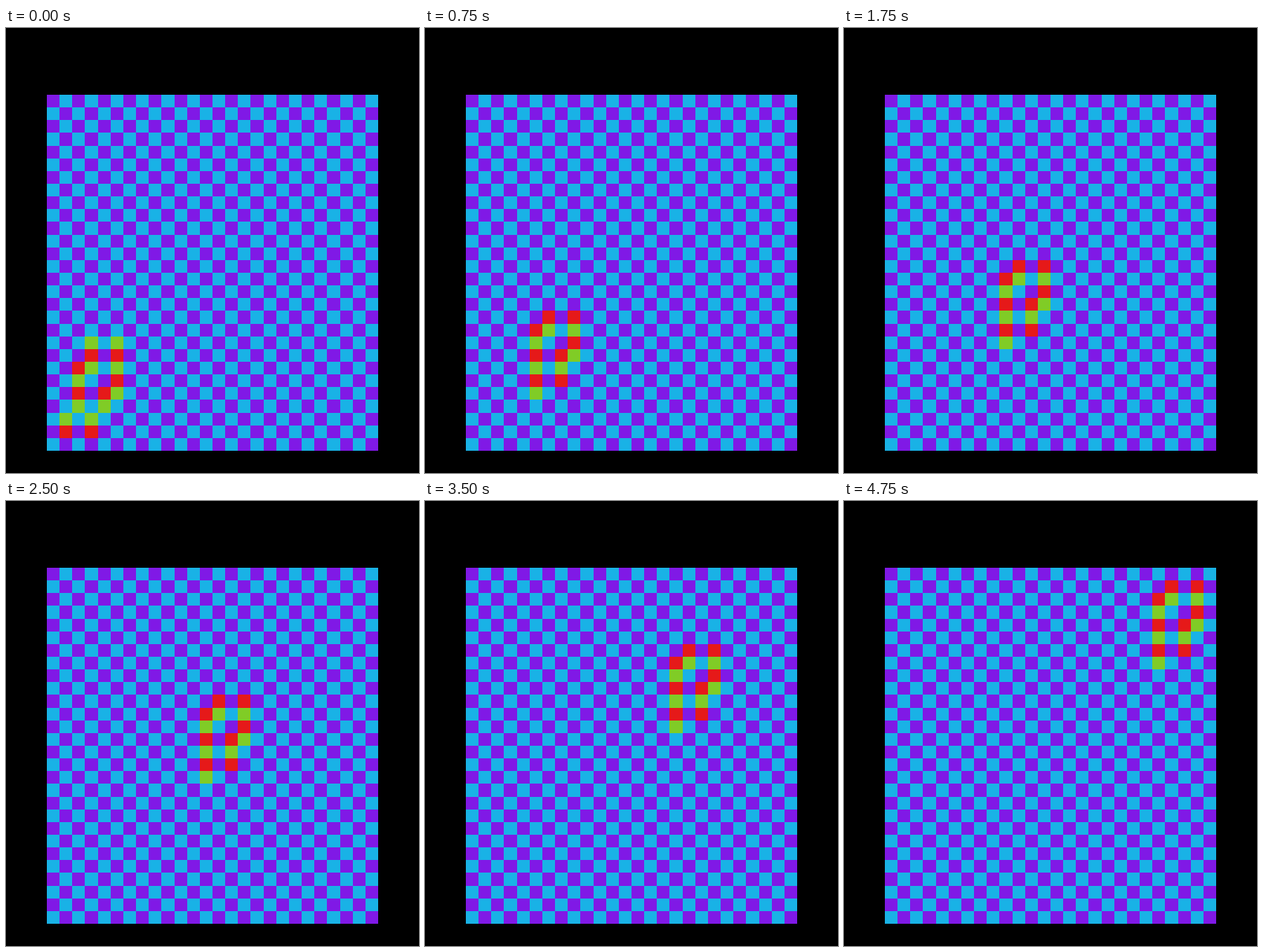
These frames come from a looping animation (556 px wide and 600 px high, 5000 ms). An HTML page with a canvas:

```html
<!DOCTYPE html>
<html lang="en">
<head>
<meta charset="utf-8">
<title>Checkerboard glider</title>
<style>
  html, body { margin: 0; width: 100%; height: 100%; overflow: hidden; background: #000; }
  canvas { display: block; }
</style>
</head>
<body>
<canvas id="stage" width="556" height="600"></canvas>
<script>
const ctx = document.getElementById('stage').getContext('2d');
const COLS = 26, ROWS = 28, STEP_MS = 250, STEPS = 20;
const BOARD = { x: 55, y: 90, w: 446, h: 480 };
// Colour pairs, indexed by the parity of column + row.
const RESTING = ['#8019e6', '#19b2e6'];
const ACTIVE = ['#80cc26', '#e61919'];

const SEED = ['..X.X', '..X.X', '.XX.X', '.X..X', '.X.XX', '.X.X.', 'X.X..', 'X.X..'];
const GLIDER = ['.X.X', 'XX.X', 'X..X', 'X.XX', 'X.X.', 'X.X.', 'X...'];
// Row of the single tail cell left in column 1 while the seed settles.
const TAIL_ROW = { 1: 26, 2: 25 };

const edgeX = col => Math.round(BOARD.x + col * BOARD.w / COLS);
const edgeY = row => Math.round(BOARD.y + row * BOARD.h / ROWS);

function fillCell(col, row, colors) {
  const x = edgeX(col), y = edgeY(row);
  ctx.fillStyle = colors[(col + row) % 2];
  ctx.fillRect(x, y, edgeX(col + 1) - x, edgeY(row + 1) - y);
}

function drawPattern(pattern, left, top) {
  pattern.forEach((line, r) => [...line].forEach((mark, c) => {
    if (mark === 'X') fillCell(left + c, top + r, ACTIVE);
  }));
}

function drawStep(step) {
  ctx.fillStyle = '#000';
  ctx.fillRect(0, 0, 556, 600);
  for (let row = 0; row < ROWS; row++)
    for (let col = 0; col < COLS; col++) fillCell(col, row, RESTING);

  if (step === 0) drawPattern(SEED, 1, 19);
  else drawPattern(GLIDER, 2 + step, 20 - step);
  if (TAIL_ROW[step]) fillCell(1, TAIL_ROW[step], ACTIVE);
}

const start = performance.now();
let shown = -1;
function tick() {
  const step = Math.floor((performance.now() - start) / STEP_MS) % STEPS;
  if (step !== shown) drawStep(shown = step);
  requestAnimationFrame(tick);
}
tick();
</script>
</body>
</html>
```
